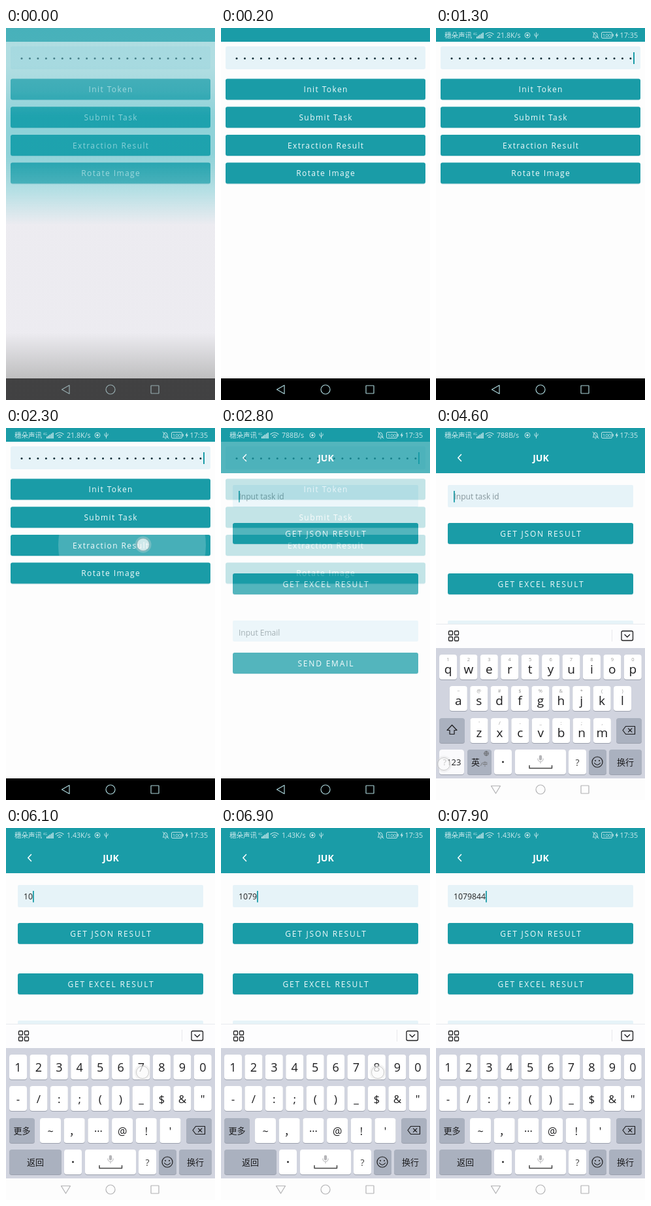
An HTML page that plays this animation: 320x568 px, repeating every 8 s.

```html
<!DOCTYPE html>
<html lang="zh-CN">
<head>
<meta charset="utf-8">
<title>Task form</title>
<style>
html, body { margin: 0; width: 100%; height: 100%; overflow: hidden; background: #fdfdfd; }
svg { display: block; width: 100vw; height: 100vh; font-family: "Open Sans", "Noto Sans CJK SC", "Noto Sans CJK", sans-serif; }
text { white-space: pre; }
.line { fill: none; stroke-linecap: round; stroke-linejoin: round; }
.anim { animation: 8s step-end infinite; }

.veil { animation-name: veil; }
@keyframes veil { 0% { opacity: 1 } 1.25% { opacity: .45 } 2.5%, 100% { opacity: 0 } }
.status { animation-name: status; }
@keyframes status { 0% { opacity: 0 } 3.75% { opacity: .5 } 5%, 100% { opacity: 1 } }
.blink { animation-name: blink; }
@keyframes blink { 0% { opacity: 0 } 16.25% { opacity: 1 } 22.5% { opacity: 0 } 28.75%, 100% { opacity: 1 } }

.ripple { animation-name: ripple; }
@keyframes ripple {
  0% { transform: translate(210px, 178px) scale(0) }
  28.75% { transform: translate(193px, 179px) scale(113); opacity: 1 }
  30% { transform: translate(177px, 179px) scale(136); opacity: 1 }
  31.25% { transform: translate(160px, 179px) scale(156); opacity: .8 }
  32.5% { transform: translate(160px, 179px) scale(156); opacity: .4 }
  33.75%, 100% { transform: scale(0); opacity: 0 }
}
.form { animation-name: form; }
@keyframes form {
  0% { opacity: 0 } 32.5% { opacity: .2 } 33.75% { opacity: .5 }
  35% { opacity: .75 } 36.25% { opacity: .92 } 37.5%, 100% { opacity: 1 }
}

.keyboard { animation-name: keyboard; }
@keyframes keyboard {
  0% { opacity: 0; transform: translateY(60px) }
  42.5% { opacity: .03; transform: translateY(57px) }
  43.75% { opacity: .08; transform: translateY(53px) }
  45% { opacity: .16; transform: translateY(48px) }
  46.25% { opacity: .25; transform: translateY(42px) }
  47.5% { opacity: .6; transform: translateY(20px) }
  48.75% { opacity: .88; transform: translateY(5px) }
  50%, 100% { opacity: 1; transform: none }
}
.lightnav { animation-name: lightnav; }
@keyframes lightnav { 0% { opacity: 0 } 47.5% { opacity: .5 } 48.75% { opacity: .85 } 50%, 100% { opacity: 1 } }
.letters { animation-name: letters; }
@keyframes letters { 0% { opacity: 1 } 60%, 100% { opacity: 0 } }
.numbers { animation-name: numbers; }
@keyframes numbers { 0% { opacity: 0 } 60%, 100% { opacity: 1 } }
.pressed { animation-name: pressed; }
@keyframes pressed { 0% { opacity: 0 } 56.25% { opacity: 1 } 60%, 100% { opacity: 0 } }

.speed1 { animation-name: speed1; }
@keyframes speed1 { 0% { opacity: 1 } 33.75%, 100% { opacity: 0 } }
.speed2 { animation-name: speed2; }
@keyframes speed2 { 0% { opacity: 0 } 33.75% { opacity: 1 } 70%, 100% { opacity: 0 } }
.speed3 { animation-name: speed3; }
@keyframes speed3 { 0% { opacity: 0 } 70%, 100% { opacity: 1 } }

.hint { animation-name: hint; }
@keyframes hint { 0% { opacity: 1 } 68.75%, 100% { opacity: 0 } }
.typing { animation-name: typing; }
@keyframes typing {
  0% { transform: none }
  68.75% { transform: translateX(7px) }
  73.75% { transform: translateX(14px) }
  78.75% { transform: translateX(21px) }
  83.75% { transform: translateX(28px) }
  87.5% { transform: translateX(35px) }
  92.5% { transform: translateX(42px) }
  96.25%, 100% { transform: translateX(49px) }
}

.touch { animation-name: touch; }
@keyframes touch {
  0%, 32.5%, 61.25%, 68.75%, 73.75%, 78.75%, 83.75%, 87.5%, 92.5%, 96.25%, 100% { transform: translate(-50px, 0) }
  28.75% { transform: translate(210px, 178px) }
  56.25% { transform: translate(12px, 513px) }
  66.25% { transform: translate(19px, 372px) }
  71.25% { transform: translate(304px, 372px) }
  76.25% { transform: translate(209px, 373px) }
  81.25% { transform: translate(270px, 373px) }
  86.25% { transform: translate(240px, 373px) }
  90%, 93.75% { transform: translate(114px, 373px) }
}
</style>
</head>
<body>
<svg id="stage" viewBox="0 0 320 568" preserveAspectRatio="none"></svg>
<script>
const TEAL = '#1a9ca7', FIELD = '#e6f3f8', PAPER = '#fdfdfd', GREY = '#aab1bf', INK = '#1c1c1e';

const rect = (x, y, w, h, fill, r = 0, extra = '') =>
  `<rect x="${x}" y="${y}" width="${w}" height="${h}" rx="${r}" fill="${fill}" ${extra}/>`;
const line = (d, color, width = 1.2) =>
  `<path class="line" d="${d}" stroke="${color}" stroke-width="${width}"/>`;
const circle = (x, y, r, attrs) => `<circle cx="${x}" cy="${y}" r="${r}" ${attrs}/>`;
const escapeText = s => s.replace(/&/g, '&amp;').replace(/</g, '&lt;');
const text = (x, y, s, size, fill, attrs = '') =>
  `<text x="${x}" y="${y}" font-size="${size}" fill="${fill}" ${attrs}>${escapeText(s)}</text>`;
const label = (x, y, s, size, fill = INK, attrs = '') => text(x, y, s, size, fill, 'text-anchor="middle" ' + attrs);
const anim = (name, body) => `<g class="anim ${name}">${body}</g>`;

const button = (x, y, w, s, spacing) =>
  rect(x, y + .8, w, 32, '#bcd9dd', 3) + rect(x, y, w, 32, TEAL, 3) +
  label(160 + spacing / 2, y + 20.6, s, 12, '#f2fbfc', `font-weight="500" letter-spacing="${spacing}"`);

const navIcons = (back, color) =>
  line(back, color) + circle(160, 552, 7, `fill="none" stroke="${color}" stroke-width="1.2"`) +
  rect(222, 546, 12, 12, 'none', .5, `stroke="${color}" stroke-width="1.2"`);

function statusBar() {
  const c = '#cdeaed';
  const bars = [0, 1, 2, 3, 4].map(i => rect(62 + i * 2.3, 13 - i * 1.5, 1.5, 3 + i * 1.5, c)).join('');
  const wifi = line('M76 9.5Q82 4.500 88 9.500M78.300 12Q82 9 85.700 12M80.500 14.300Q82 13 83.500 14.300', c, 1.1);
  const speeds = ['21.8K/s', '788B/s', '1.43K/s']
    .map((s, i) => anim('speed' + (i + 1), text(93, 15, s, 10.6, c))).join('');
  const record = circle(140, 11, 4, `fill="none" stroke="${c}" stroke-width=".9"`) + circle(140, 11, 1.8, `fill="${c}"`);
  const usb = line('M153.500 7V15.500M151 9V11.500L153.500 13L156 11V9', c, .9);
  const bell = line('M240.500 14H248Q247 13 247 10Q246.500 7 244 7Q241.500 7 241.500 10Q241.500 13 240.500 14M243.500 16H245M240 6L249 16', c, .9);
  const battery = rect(253.5, 6.5, 16, 9, 'none', 1.5, `stroke="${c}" stroke-width=".9"`) +
    label(261.500, 14.1, '100', 8, c) + rect(270.5, 9, 1.2, 4, c);
  const bolt = `<path d="M277.500 6.500L274.500 11.500H276.500L275.800 15.500L279 10.200H277Z" fill="${c}"/>`;
  return text(13, 15, '穗朵声讯', 10.5, c) + text(57, 10.5, '4G', 4.5, c) + bars + wifi + speeds +
    record + usb + bell + battery + bolt + text(281.5, 15, '17:35', 10.8, c);
}

function home() {
  const dots = Array.from({ length: 23 }, (_, i) => circle(24 + i * 12.45, 46.5, 1.5, 'fill="#15303a"')).join('');
  const buttons = ['Init Token', 'Submit Task', 'Extraction Result', 'Rotate Image']
    .map((s, i) => button(7, 77.5 + i * 42.7, 306, s, 1.4)).join('');
  return rect(0, 0, 320, 568, PAPER) + rect(0, 0, 320, 21, TEAL) + rect(7, 28, 306, 35, FIELD, 3) + dots +
    anim('blink', rect(302, 37, 2, 18, TEAL)) + buttons +
    '<g clip-path="url(#pill)"><circle class="anim ripple" r="1" fill="#fff" fill-opacity=".2"/></g>';
}

function form() {
  return rect(0, 0, 320, 568, PAPER) + rect(0, 0, 320, 69, TEAL) +
    line('M38.500 40.500L33.800 45.500L38.500 50.500', '#fff', 1.5) +
    label(160.5, 51, 'JUK', 14, '#fff', 'font-weight="700"') +
    rect(18, 87, 284, 34, FIELD, 2) + text(27, 109, '1079844', 12.24, '#222') +
    anim('typing', rect(27, 92, 60, 24, FIELD) + rect(27, 96, 1.800, 17.500, TEAL)) +
    anim('hint', text(27.5, 109, 'Input task id', 12, '#84959b')) +
    button(18, 145, 284, 'GET JSON RESULT', 1.8) + button(18, 222, 284, 'GET EXCEL RESULT', 1.8) +
    rect(18, 294, 284, 32, FIELD, 2) + text(27, 316.500, 'Input Email', 12, '#84959b') +
    button(18, 343, 284, 'SEND EMAIL', 1.8);
}

const key = (x, y, w, fill = '#fff') => rect(x, y + 1, w, 38, '#9ca1ae', 4) + rect(x, y, w, 38, fill, 4);

// A row of equal keys; optional hints sit above the main characters.
const keyRow = (chars, first, pitch, y, width, hints = '', size = 18) => [...chars].map((c, i) => {
  const x = first + i * pitch;
  return key(x - width / 2, y, width) +
    (hints ? label(x, y + 10, hints[i], 7.5, '#999') : '') +
    label(x, y + (hints ? 28.500 : 25.500), c === '…' ? '···' : c, size);
}).join('');

function sharedKeys() {
  const smile = circle(247, 510, 8, `fill="none" stroke="${INK}" stroke-width="1.2"`) +
    circle(244, 508, 1, `fill="${INK}"`) + circle(250, 508, 1, `fill="${INK}"`) +
    line('M242.500 511.500Q247 517.500 251.500 511.500', INK, 1.1);
  const mic = rect(157.8, 499.5, 4.4, 8, '#b5b5b8', 2.2) + line('M155.800 505Q156 509.500 160 509.500Q164 509.500 164.200 505M160 510V512', '#b5b5b8', 1);
  return key(276, 443, 39, GREY) +
    line('M286 461.500L290.500 455.500H304.500V467.500H290.500ZM294.500 458.800L299.800 464.200M299.800 458.800L294.500 464.200', INK) +
    key(89, 491, 27) + circle(102.5, 510, 1.4, `fill="${INK}"`) +
    key(121, 491, 78) + mic + line('M143 515.500V519.500H177.500V515.500', '#444', 1.5) +
    key(203, 491, 27) + label(216.5, 515.5, '?', 14, '#444') +
    key(234, 491, 27, GREY) + smile + key(265, 491, 50, GREY) + label(290, 515, '换行', 13);
}

function letterKeys() {
  const globe = circle(77, 497, 3.300, 'fill="none" stroke="#555" stroke-width=".7"') +
    line('M73.700 497H80.300M77 493.700Q74.500 497 77 500.300Q79.500 497 77 493.700', '#555', .6);
  return keyRow('qwertyuiop', 18.5, 31.42, 346, 27, '1234567890', 19) +
    keyRow('asdfghjkl', 34.3, 31.4, 394, 27, '~@#$%&*()', 19) +
    keyRow('zxcvbnm', 66, 31.4, 443, 27, "'/-_:;,", 19) +
    key(5, 443, 39, GREY) + line('M24.500 453.500L32 461.500H28V467.500H21V461.500H17Z', INK) +
    key(5, 491, 38, GREY) + anim('pressed', rect(5, 491, 38, 38, '#fafafc', 4)) + label(24.5, 515, '?123', 13) +
    key(48, 491, 37, GREY) + label(60.5, 515, '英', 13) + text(68, 516, '/中', 8, '#666') + globe;
}

function numberKeys() {
  return keyRow('1234567890', 18.5, 31.42, 346, 27) + keyRow('-/:;()_$&"', 18.5, 31.42, 394, 27, '', 17) +
    keyRow("~，…@!'", 68, 36.7, 443, 32, '', 16) +
    key(5, 443, 39, GREY) + label(24.5, 467, '更多', 13) +
    key(5, 491, 80, GREY) + label(45, 515, '返回', 13);
}

function keyboard() {
  const grid = [[19.500, 310], [28.500, 310], [19.500, 319], [28.500, 319]]
    .map(([x, y]) => rect(x, y, 6, 6, 'none', 1.2, `stroke="${INK}" stroke-width="1.3"`)).join('');
  return rect(0, 299, 320, 37, '#fdfdfe') + rect(0, 299, 320, .8, '#e4e6ea') + rect(0, 336, 320, 199, '#d1d4df') +
    grid + rect(269, 308, .8, 18, '#e4e4e8') +
    rect(284, 310, 17.5, 14.5, 'none', 2, `stroke="${INK}" stroke-width="1.3"`) +
    line('M289 315.500L292.800 319.200L296.600 315.500', INK, 1.3) +
    anim('letters', letterKeys()) + anim('numbers', numberKeys()) + sharedKeys();
}

const veilStops = [
  [0, '110,195,203,.55'], [.1, '115,196,204,.55'], [.17, '90,186,196,.55'], [.24, '34,168,181,.5'],
  [.34, '34,168,181,.5'], [.4, '95,188,197,.55'], [.44, '125,200,209,.55'], [.53, '220,218,228,.5'],
  [.82, '220,218,228,.5'], [.94, '130,130,132,.5'], [1, '130,130,132,.5']
].map(([at, c]) => `<stop offset="${at}" stop-color="rgba(${c})"/>`).join('');

document.getElementById('stage').innerHTML =
  `<defs><linearGradient id="veil" x2="0" y2="1">${veilStops}</linearGradient>
   <clipPath id="pill">${rect(7, 163, 306, 32, '#000', 3)}</clipPath></defs>` +
  home() + anim('form', form()) + anim('status', statusBar()) +
  rect(0, 535, 320, 33, '#000') + navIcons('M97 545.500V558.500L85.500 552Z', '#a9d3d8') +
  anim('lightnav', rect(0, 535, 320, 33, PAPER) + navIcons('M84.500 546.500H98.500L91.500 558Z', '#b2b2b4')) +
  anim('keyboard', keyboard()) +
  anim('veil', rect(0, 0, 320, 568, 'url(#veil)')) +
  anim('touch', circle(0, 0, 12.500, 'fill="rgba(220,220,220,.3)"') +
    circle(0, 0, 9.5, 'fill="rgba(255,255,255,.65)" stroke="rgba(150,150,150,.45)" stroke-width="1"'));
</script>
</body>
</html>
```
